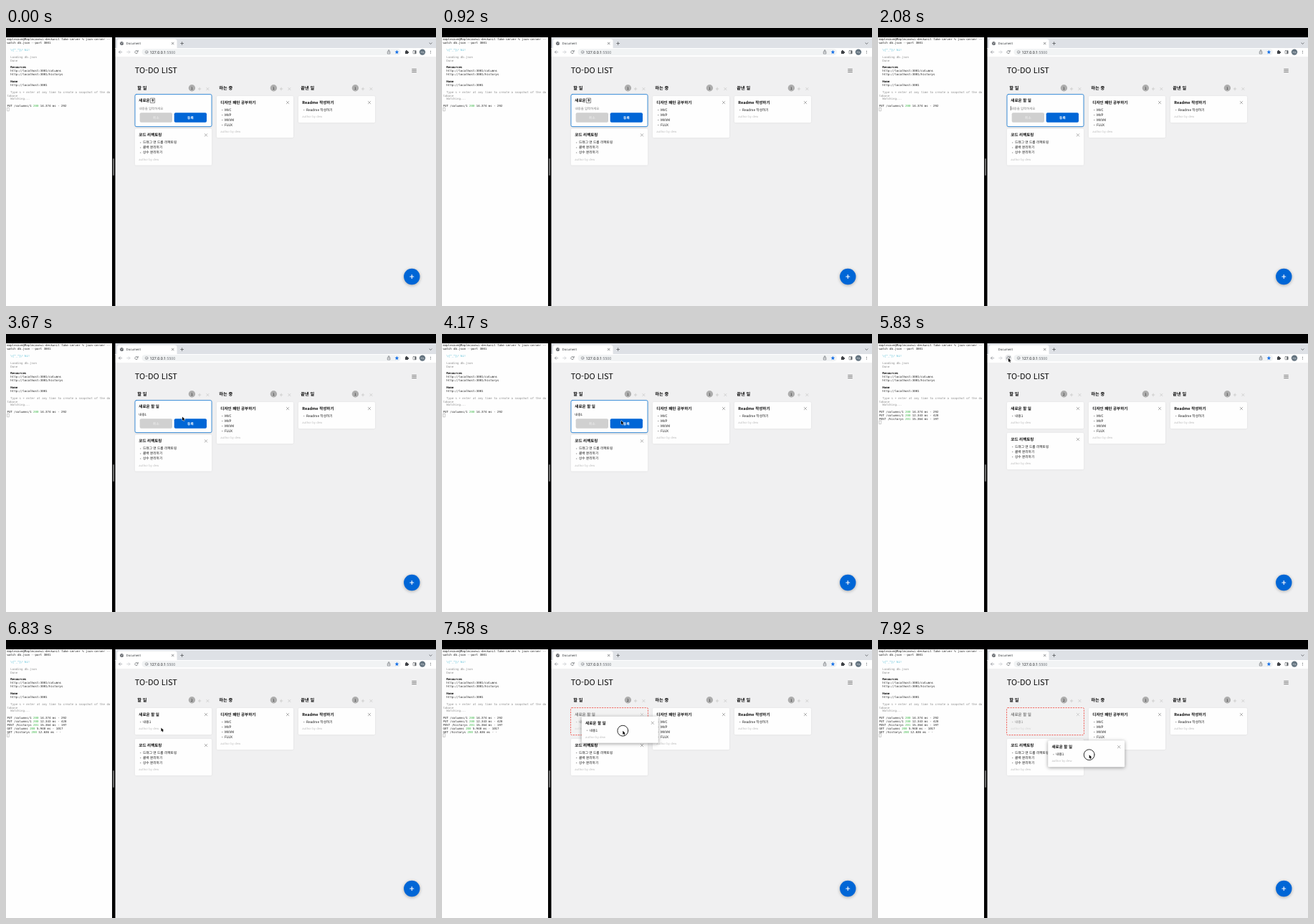
An HTML page with a canvas for the animation above (8 s loop, 600x388 px).

```html
<!DOCTYPE html>
<html lang="ko">
<head>
<meta charset="utf-8">
<title>TO-DO LIST</title>
<style>
html, body { margin: 0; width: 100%; height: 100%; overflow: hidden; background: #000; }
canvas { display: block; width: 600px; height: 388px; }
</style>
</head>
<body>
<canvas id="stage"></canvas>
<script>
const LOOP = 8000, TICK = 250 / 3;
const KR = '"Noto Sans CJK KR", "Noto Sans CJK", "Noto Sans KR", sans-serif';
const MONO = '"DejaVu Sans Mono", monospace';
const UI = 'Roboto, sans-serif';
const BLUE = '#0066d6';

const cv = document.getElementById('stage');
const dpr = window.devicePixelRatio || 1;
cv.width = 600 * dpr;
cv.height = 388 * dpr;
const c = cv.getContext('2d');
c.scale(dpr, dpr);
c.textRendering = 'geometricPrecision';
c.lineCap = 'round';

// ---- drawing helpers ----
function box(x, y, w, h, fill, r = 0) {
  c.fillStyle = fill;
  c.beginPath();
  c.roundRect(x, y, w, h, r);
  c.fill();
}

function outline(x, y, w, h, color, lw, r = 0) {
  c.strokeStyle = color;
  c.lineWidth = lw;
  c.beginPath();
  c.roundRect(x, y, w, h, r);
  c.stroke();
}

function disc(x, y, r, fill) {
  c.fillStyle = fill;
  c.beginPath();
  c.arc(x, y, r, 0, 7);
  c.fill();
}

function ring(x, y, r, color, lw, from = 0, to = Math.PI * 2) {
  c.strokeStyle = color;
  c.lineWidth = lw;
  c.beginPath();
  c.arc(x, y, r, from, to);
  c.stroke();
}

function path(color, lw, ...pts) {
  c.strokeStyle = color;
  c.lineWidth = lw;
  c.beginPath();
  for (let i = 0; i < pts.length; i += 2) c.lineTo(pts[i], pts[i + 1]);
  c.stroke();
}

// y is the visual middle of capitals; returns the advance
function text(str, x, y, size, color, { weight = 400, font = KR, align = 'left' } = {}) {
  c.font = `${weight} ${size}px ${font}`;
  c.fillStyle = color;
  c.textAlign = align;
  c.textBaseline = 'alphabetic';
  c.fillText(str, x, y + size * 0.36);
  return c.measureText(str).width;
}

function cross(x, y, r, color, lw) {
  path(color, lw, x - r, y - r, x + r, y + r);
  path(color, lw, x - r, y + r, x + r, y - r);
}

function plus(x, y, r, color, lw) {
  path(color, lw, x - r, y, x + r, y);
  path(color, lw, x, y - r, x, y + r);
}

function shadow(blur, dy, alpha, draw) {
  c.save();
  c.shadowColor = `rgba(0,0,0,${alpha})`;
  c.shadowBlur = blur * dpr;
  c.shadowOffsetY = dy * dpr;
  draw();
  c.restore();
}

// ---- terminal ----
const DARK = '#1c1c1c', GREY = '#8c8c8c';
const BOOT = [
  [0, 'maplecove@Maplecoveui-deskunit fake-server % json-server --'],
  [1, 'watch db.json --port 3001'],
  [3, '  \\{^_^}/ hi!', '#3fb4cf'],
  [5, '  Loading db.json', GREY],
  [6, '  Done', GREY],
  [8, '  Resources', '#000', 700],
  [9, '  http://localhost:3001/columns'],
  [10, '  http://localhost:3001/historys'],
  [12, '  Home', '#000', 700],
  [13, '  http://localhost:3001'],
  [15, '  Type s + enter at any time to create a snapshot of the da', GREY],
  [16, 'tabase', GREY],
  [17, '  Watching...', GREY]
];
const REQUESTS = [
  [0, 'PUT /columns/1 ', '200', ' 14.374 ms - 292'],
  [4240, 'PUT /columns/1 ', '200', ' 12.343 ms - 428'],
  [4320, 'POST /historys ', '201', ' 15.364 ms - 197'],
  [5990, 'GET /columns ', '200', ' 5.940 ms - 1017'],
  [6080, 'GET /historys ', '200', ' 12.636 ms - -']
];
const rowY = k => 16 + 4.88 * k;

function terminal(t) {
  box(0, 13, 148, 375, '#fefefe');
  for (const [k, str, color = DARK, weight = 400] of BOOT)
    text(str, 1.5, rowY(k), 4.05, color, { font: MONO, weight });
  let row = 19;
  for (const [at, ...parts] of REQUESTS) {
    if (t < at) break;
    let x = 1.5;
    parts.forEach((str, i) => {
      x += text(str, x, rowY(row), 4.05, i === 1 ? '#35b540' : DARK, { font: MONO });
    });
    row++;
  }
  outline(2, rowY(row) - 2.4, 2.3, 4.6, '#a8a8a8', 0.6);
  box(149, 182, 2, 24, '#6c6c6c', 1);
}

// ---- browser window ----
function star(x, y, r) {
  c.fillStyle = '#1a73e8';
  c.beginPath();
  for (let i = 0; i < 10; i++) {
    const a = i * Math.PI / 5 - Math.PI / 2, q = i % 2 ? r * 0.45 : r;
    c.lineTo(x + q * Math.cos(a), y + q * Math.sin(a));
  }
  c.fill();
}

function browser(t) {
  box(152.5, 13, 447.5, 16, '#dee1e6');
  box(155, 15.5, 83.5, 14, '#fff', [3, 3, 0, 0]);
  if (t < 5660 || t >= 5990) {
    disc(161.5, 21.5, 2.5, '#5f6368');
    path('#fff', 0.5, 160, 20.6, 161.5, 21.4, 160.9, 22.8);
    path('#fff', 0.5, 162.4, 19.9, 163.2, 21.6);
  }
  text('Document', 167.8, 21.5, 4.4, '#3c4043', { font: UI });
  cross(232.7, 21.5, 1.4, '#4a4d51', 0.6);
  plus(245.6, 21.5, 2, '#4a4d51', 0.7);
  path('#4a4d51', 0.7, 590.8, 20.8, 592.5, 22.4, 594.2, 20.8);

  box(152.5, 28, 447.5, 12, '#fff');
  path('#8d9095', 0.7, 161.8, 33.6, 157.4, 33.6);
  path('#8d9095', 0.7, 159.4, 31.6, 157.4, 33.6, 159.4, 35.6);
  path('#c3c6ca', 0.7, 168.6, 33.6, 173, 33.6);
  path('#c3c6ca', 0.7, 171, 31.6, 173, 33.6, 171, 35.6);
  if (t >= 5410 && t < 6410) disc(182, 33.6, 4.8, '#e6e7e9');
  ring(182, 33.6, 2.1, '#5f6368', 0.7, 0.5, 5.6);
  path('#5f6368', 0.7, 184.2, 31.2, 184.2, 33, 182.5, 33);

  box(189.5, 29, 361.5, 9.2, '#f1f3f4', 4.6);
  ring(196.2, 33.6, 1.9, '#5f6368', 0.5);
  path('#5f6368', 0.5, 196.2, 33.5, 196.2, 34.5);
  const w = text('127.0.0.1', 200.8, 33.7, 5.35, '#202124', { font: UI });
  text(':5500', 200.8 + w, 33.7, 5.35, '#73777c', { font: UI });

  path('#5f6368', 0.6, 533, 32.8, 532.3, 32.8, 532.3, 36, 535.9, 36, 535.9, 32.8, 535.2, 32.8);
  path('#5f6368', 0.6, 534.1, 34.4, 534.1, 30.8);
  path('#5f6368', 0.6, 533.1, 31.7, 534.1, 30.7, 535.1, 31.7);
  star(545.4, 33.7, 3);
  box(557, 32, 4, 4, '#3f4246', 0.5);
  disc(558.8, 31.6, 0.9, '#3f4246');
  disc(561.3, 34, 0.9, '#3f4246');
  outline(568, 31.6, 4.2, 4.2, '#5f6368', 0.6, 0.4);
  box(570.3, 31.6, 1.9, 4.2, '#5f6368');
  disc(581, 33.6, 4.2, '#62727e');
  text('하늘', 581, 33.6, 3, '#dfe5e9', { align: 'center' });
  for (const dy of [-1.7, 0, 1.7]) disc(592.5, 33.6 + dy, 0.5, '#5f6368');

  box(152.5, 40, 447.5, 348, '#f0f0f1');
}

// ---- board ----
const COLS = [
  { x: 180, name: '할 일' },
  { x: 294, name: '하는 중' },
  { x: 408, name: '끝낸 일' }
];
const TASK = ['새로운 할 일', ['내용1']];
const REFACTOR = ['코드 리팩토링', ['드래그 앤 드롭 리팩토링', '콜백 분리하기', '상수 분리하기']];
const STUDY = ['디자인 패턴 공부하기', ['MVC', 'MVP', 'MVVM', 'FLUX']];
const README = ['Readme 작성하기', ['Readme 작성하기']];

function card(x, y, [title, items], lift) {
  const h = 30 + 7 * items.length;
  shadow(lift ? 5 : 3, lift ? 1 : 0.3, lift ? 0.4 : 0.07, () => box(x, y, 107, h, '#fefefe', 1.5));
  text(title, x + 5.3, y + 9, 5.56, '#0a0a0a', { weight: 700 });
  cross(x + 99, y + 9, 1.8, '#828282', 0.6);
  items.forEach((str, i) => {
    const cy = y + 19.3 + 7 * i;
    disc(x + 7.7, cy + 0.3, 0.75, '#a0a0a0');
    text(str, x + 11, cy, 4.72, '#111');
  });
  text('author by dew', x + 5.3, y + h - 8.3, 4.1, '#b9b9b9');
}

function columnHead({ x, name }, count) {
  text(name, x + 3.2, 83.3, 6.25, '#0a0a0a', { weight: 700 });
  disc(x + 79.4, 83.8, 4.7, '#adadad');
  text(count, x + 79.4, 83.9, 4.9, '#222', { align: 'center' });
  plus(x + 90, 85, 1.9, '#bdbdbd', 0.6);
  cross(x + 101.4, 85, 1.6, '#bdbdbd', 0.6);
}

// typed states: time, settled text, syllable being composed
const TITLE = [
  [0, '새로운 ', 'ㅎ'], [1410, '새로운 ', '하'], [1490, '새로운 ', '할'],
  [1580, '새로운 할 ', ''], [1660, '새로운 할 ', 'ㅇ'], [1825, '새로운 할 ', '이'],
  [1910, '새로운 할 ', '일'], [1990, '새로운 할 일', '']
];
const BODY = [
  [0, '', ''], [2325, '', 'ㄴ'], [2410, '', '내'], [2490, '내', 'ㅇ'],
  [2575, '내', '요'], [2660, '내', '용'], [2825, '내용1', '']
];
const stateAt = (list, t) => list.filter(s => s[0] <= t).pop();

function typed(list, t, y, size, weight) {
  const [, done, live] = stateAt(list, t);
  const x = 185.3 + text(done, 185.3, y, size, '#0a0a0a', { weight });
  if (!live) return;
  const w = text(live, x, y, size, '#0a0a0a', { weight });
  outline(x - 0.3, y - size * 0.56, w + 0.6, size * 1.15, '#444', 0.6);
}

function form(t) {
  shadow(3, 0.4, 0.15, () => box(180, 92.6, 107, 45, '#fefefe', 2));
  outline(180, 92.6, 107, 45, '#2b86d9', 0.9, 2);
  typed(TITLE, t, 101.2, 5.56, 700);
  if (t < 2325) text('내용을 입력하세요', 185.5, 112, 4.45, '#7c7c7c');
  else typed(BODY, t, 112, 4.5, 400);
  if (t >= 1990 && t < 2325) path('#111', 0.6, 185.3, 109.3, 185.3, 114.6);
  box(186.7, 118.2, 45.3, 13.6, '#d0d0d0', 2);
  text('취소', 209.4, 125, 4.7, '#f4f4f4', { align: 'center' });
  box(234.7, 118.2, 45.3, 13.6, BLUE, 2);
  text('등록', 257.4, 125, 4.7, '#fff', { align: 'center', weight: 700 });
}

const SAVED = 4320, PRESS = 7240, DRAG = 7490;

function board(t) {
  text('TO-DO LIST', 179.7, 59.2, 11, '#0a0a0a');
  for (const y of [57.4, 59.5, 61.6]) path('#555', 0.7, 566.6, y, 572.4, y);
  const saved = t >= SAVED;
  COLS.forEach((col, i) => columnHead(col, i === 0 && saved ? '2' : '1'));

  if (saved) {
    c.globalAlpha = t >= DRAG ? 0.5 : 1;
    card(180, 95, TASK);
    c.globalAlpha = 1;
    if (t >= DRAG) {
      c.setLineDash([2.1, 1.4]);
      c.lineCap = 'butt';
      outline(179.6, 94.6, 107.8, 38, '#f4615a', 1, 1.5);
      c.setLineDash([]);
      c.lineCap = 'round';
    }
    card(180, 138, REFACTOR);
  } else {
    form(t);
    card(180, 140.4, REFACTOR);
  }
  card(294, 95, STUDY);
  card(408, 95, README);

  shadow(4, 1, 0.3, () => disc(566.3, 347, 11.2, BLUE));
  plus(566.3, 347, 2.5, '#fff', 1.1);
}

// ---- pointer ----
const ROUTE = [
  [3417, 206, 102], [3667, 246, 115.5], [3917, 250, 121], [4750, 250, 121],
  [4833, 243.5, 105.5], [5417, 182, 33.8], [6333, 182, 33.8], [6833, 216.5, 122.5],
  [7167, 237.5, 115], [7417, 237.5, 115], [7917, 294.7, 160.2]
];

function pointerAt(t) {
  let i = 1;
  while (i < ROUTE.length - 1 && ROUTE[i][0] < t) i++;
  const [t0, x0, y0] = ROUTE[i - 1], [t1, x1, y1] = ROUTE[i];
  const u = Math.min(1, Math.max(0, (t - t0) / (t1 - t0)));
  const e = u * u * (3 - 2 * u);
  return [x0 + (x1 - x0) * e, y0 + (y1 - y0) * e];
}

function arrow(x, y) {
  c.beginPath();
  for (const [dx, dy] of [[0, 0], [0, 5.2], [1.2, 4.1], [2, 6], [2.9, 5.6], [2.1, 3.8], [3.7, 3.7]])
    c.lineTo(x + dx, y + dy);
  c.closePath();
  c.strokeStyle = '#fff';
  c.lineWidth = 0.8;
  c.stroke();
  c.fillStyle = '#000';
  c.fill();
}

function pointer(t) {
  if (t < 3410) return;
  const [x, y] = pointerAt(t);
  if (t >= DRAG) card(x - 57.5, y - 20, TASK, true);
  if (t >= PRESS) ring(x, y, 7.4, '#111', 0.9);
  arrow(x, y);
}

function draw(now) {
  const t = Math.floor((now % LOOP) / TICK + 0.1) * TICK % LOOP;
  box(0, 0, 600, 388, '#000');
  terminal(t);
  browser(t);
  board(t);
  pointer(t);
}

let start;
function loop(now) {
  start ??= now;
  draw(now - start);
  requestAnimationFrame(loop);
}
draw(0);
requestAnimationFrame(loop);
</script>
</body>
</html>
```
